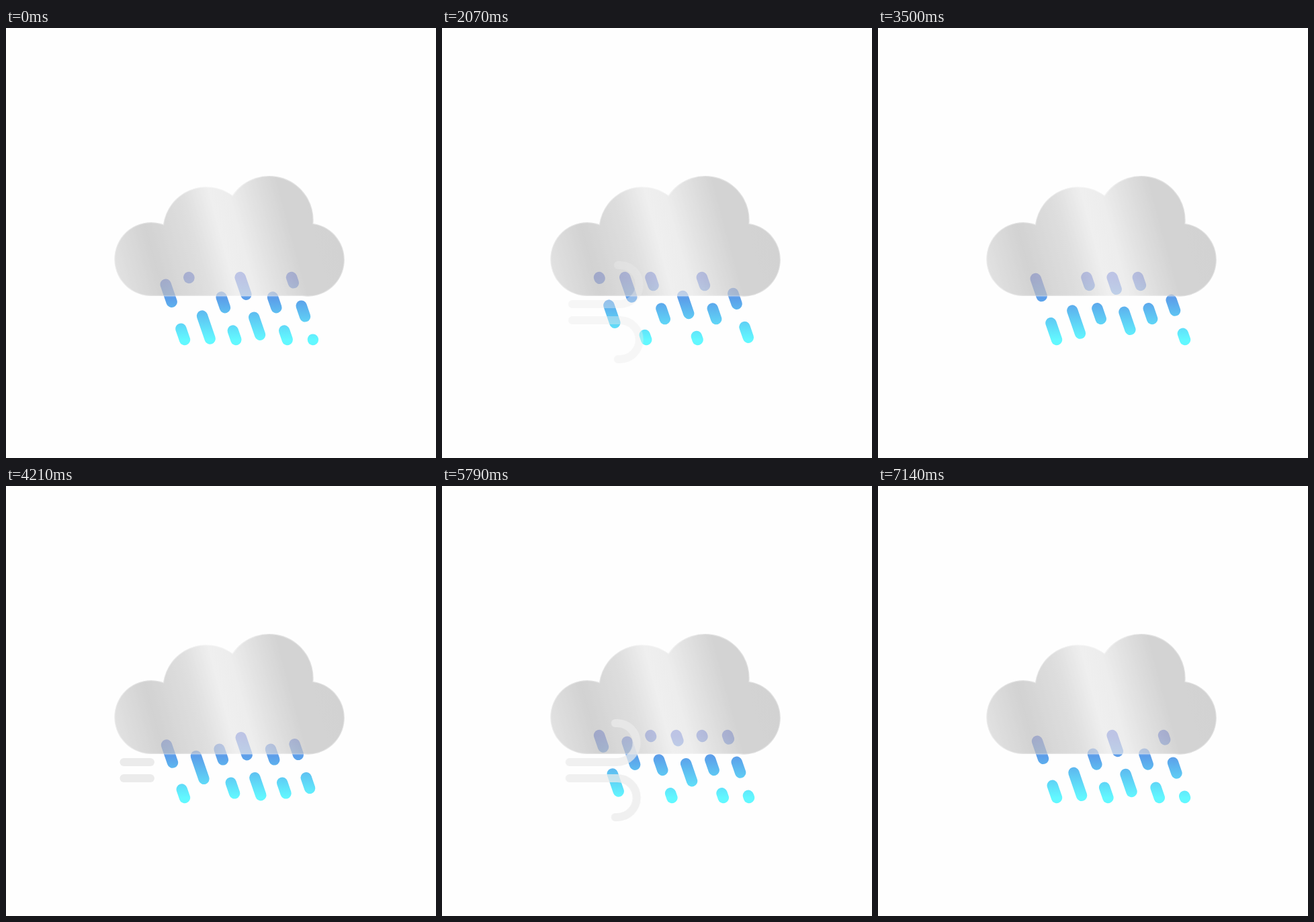
An HTML page that plays this animation: 640 px wide and 640 px high, repeating every 7210 ms.

```html
<!DOCTYPE html>
<html lang="en">
<head>
<meta charset="utf-8">
<title>Rain and wind</title>
<style>
  html, body { margin: 0; width: 100%; height: 100%; overflow: hidden; background: #fefefe; }
  svg { display: block; width: 100vw; height: 100vh; }
  line, .wind { animation: 7210ms linear infinite; }

  /* --dash, --period and --start are vertical distances along a streak */
  line {
    stroke: url(#water);
    stroke-width: 16.4;
    stroke-linecap: round;
    stroke-dasharray: var(--dash) calc(var(--period) - var(--dash));
    animation-name: fall;
  }
  @keyframes fall {
    from { stroke-dashoffset: calc(-1px * var(--start)); }
    to { stroke-dashoffset: calc(-1px * (var(--start) + var(--period) * var(--cycles) * 1.0074)); }
  }

  .wind {
    fill: none;
    stroke: #ebebeb;
    stroke-width: 12;
    stroke-linecap: round;
    stroke-dasharray: 100 110;
    animation-name: gust;
  }
  /* Two gusts: draw in, then drift right and fade */
  @keyframes gust {
    0% { stroke-dashoffset: 102px; opacity: 1; transform: translateX(0); }
    15.1% { stroke-dashoffset: 0px; transform: translateX(0); }
    23.4% { opacity: 1; }
    32.3% { stroke-dashoffset: 0px; opacity: 0; transform: translateX(23.2px); }
    32.31%, 54.54% { stroke-dashoffset: 102px; opacity: 0; transform: translateX(0); }
    54.55% { stroke-dashoffset: 102px; opacity: 1; }
    69.7% { stroke-dashoffset: 0px; transform: translateX(0); }
    78.05% { opacity: 1; }
    86.95%, 100% { stroke-dashoffset: 0px; opacity: 0; transform: translateX(23.2px); }
  }
</style>
</head>
<body>
<svg viewBox="0 0 640 640">
  <defs>
    <linearGradient id="water" gradientUnits="userSpaceOnUse" x1="0" y1="371" x2="0" y2="464">
      <stop offset="0" stop-color="#5870de"/>
      <stop offset="1" stop-color="#62f8ff"/>
    </linearGradient>
    <linearGradient id="vapour" gradientUnits="userSpaceOnUse" x1="150" y1="310" x2="466.9" y2="224.4">
      <stop offset="0" stop-color="#d6d6d6"/>
      <stop offset=".18" stop-color="#c0c0c0"/>
      <stop offset=".38" stop-color="#d2d2d2"/>
      <stop offset=".5" stop-color="#e9e9e9"/>
      <stop offset=".58" stop-color="#e7e7e7"/>
      <stop offset=".69" stop-color="#d5d5d5"/>
      <stop offset=".81" stop-color="#c2c2c2"/>
      <stop offset="1" stop-color="#c0c0c0"/>
    </linearGradient>
  </defs>

  <g>
    <line x1="234" y1="371" x2="266" y2="464" pathLength="93" style="--dash:26;--period:66;--start:10.6;--cycles:12"/>
    <line x1="272.2" y1="371" x2="304.2" y2="464" pathLength="93" style="--dash:34;--period:90.5;--start:57.4;--cycles:8"/>
    <line x1="310.4" y1="371" x2="342.4" y2="464" pathLength="93" style="--dash:15.7;--period:50;--start:29.4;--cycles:15"/>
    <line x1="348.6" y1="371" x2="380.6" y2="464" pathLength="93" style="--dash:26;--period:60;--start:-.4;--cycles:12"/>
    <line x1="386.8" y1="371" x2="418.8" y2="464" pathLength="93" style="--dash:15.7;--period:50;--start:29.4;--cycles:15"/>
    <line x1="425" y1="371" x2="457" y2="464" pathLength="93" style="--dash:15.7;--period:50;--start:42.5;--cycles:16"/>
  </g>

  <path opacity=".7" fill="url(#vapour)" stroke="#fff" stroke-opacity=".35" stroke-width="2.5"
    d="M214 399A55 55 0 1 1 234 292A65 65 0 0 1 337 249A66 66 0 0 1 457.5 291A54 54 0 0 1 441 399Z"/>

  <g class="wind">
    <path pathLength="100" d="M175.4 411H246.4a29 29 0 0 0 0-58h-3"/>
    <path pathLength="100" d="M175.4 435H246.4a29 29 0 0 1 0 58h-3"/>
  </g>
</svg>
</body>
</html>
```
